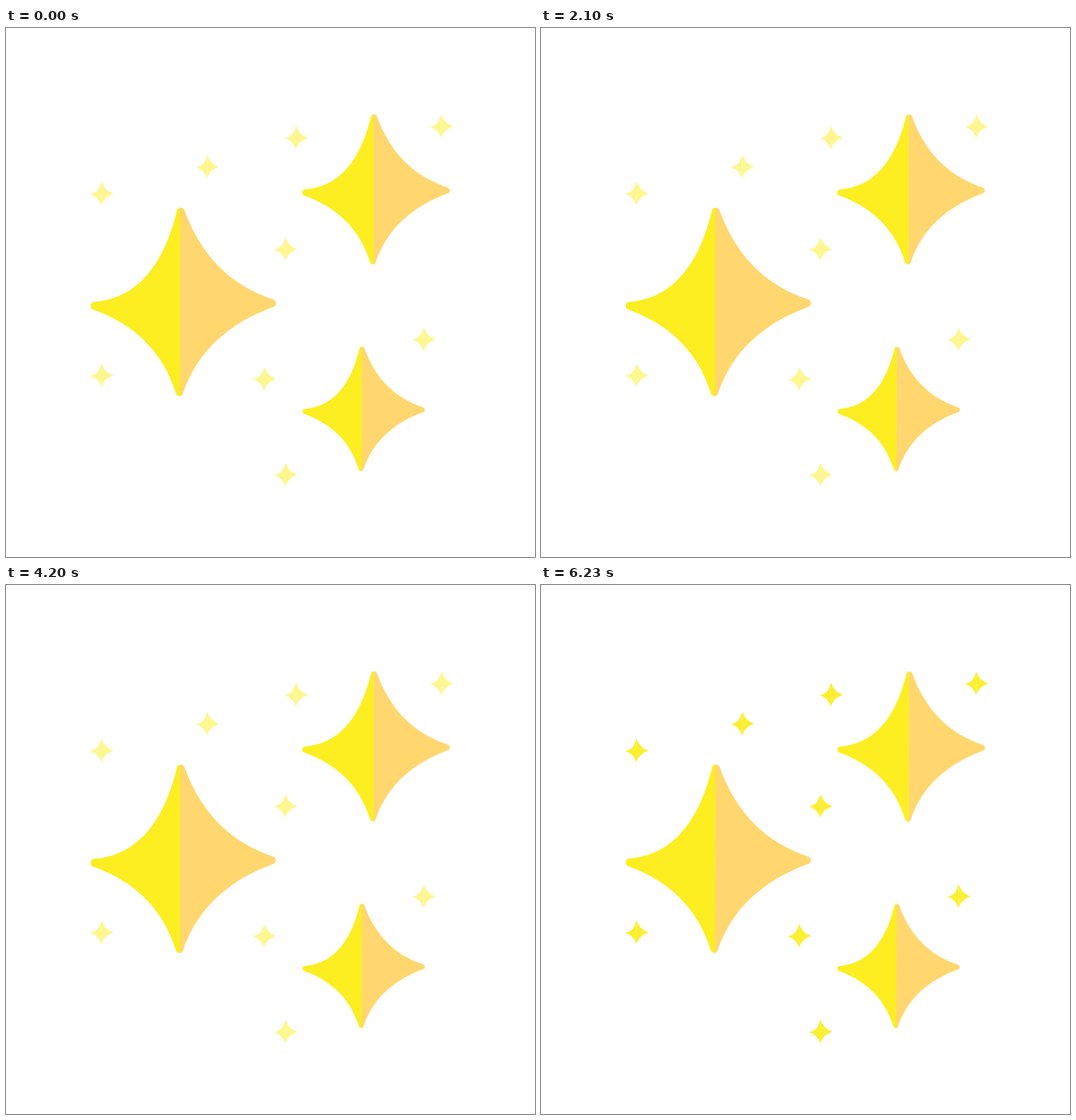
Animation, 748 px wide and 748 px high, one loop 6310 ms. Source, as an HTML page:

```html
<!DOCTYPE html>
<html lang="en">
<head>
<meta charset="utf-8">
<title>Sparkles</title>
<style>
  html, body { margin: 0; width: 100%; height: 100%; overflow: hidden; background: #fff; }
  svg { display: block; width: 100vw; height: 100vh; }
</style>
</head>
<body>
<svg viewBox="0 0 748 748">
  <defs>
    <path id="left" d="M246.2 254.1C243.8 254.5 242.2 255.6 241.8 258C222 340 182 383 124.5 387.3C118.5 388 118.5 397 123 398C182 419 222 458 240 516C240.8 519 243 520.6 246.2 520.5Z"/>
    <path id="right" d="M246 254C249 253.8 251.3 255 252.3 257.5C276 323 318 364 378 384C383 386 383 392.6 378 394.3C314 418 270 458 250.3 516.5C249.5 519 248 520.3 246 520.5Z"/>
    <g id="star">
      <use href="#right" fill="#ffd76e"/>
      <use href="#left" fill="#fcee21"/>
    </g>
    <g id="spark" fill="#fcee21" transform="scale(.1205) translate(-251 -387.5)">
      <use href="#right"/>
      <use href="#left"/>
    </g>
  </defs>
  <g id="sparks">
    <use href="#spark" x="135.5" y="234"/>
    <use href="#spark" x="285" y="196"/>
    <use href="#spark" x="410.5" y="155"/>
    <use href="#spark" x="616" y="139"/>
    <use href="#spark" x="395.5" y="312.5"/>
    <use href="#spark" x="135.5" y="491"/>
    <use href="#spark" x="365.5" y="496"/>
    <use href="#spark" x="591" y="440"/>
    <use href="#spark" x="395.5" y="631.5"/>
  </g>
  <g id="stars">
    <use href="#star"/>
    <use href="#star" transform="translate(323.4 -80.4) scale(.797)"/>
    <use href="#star" transform="translate(340.3 282.9) scale(.66)"/>
  </g>
</svg>
<script>
  const LOOP = 6310, STEP = 70, SWING = 1050, FADE = 210;
  const stars = document.getElementById('stars');
  const sparks = document.getElementById('sparks');
  const start = performance.now();

  const ease = s => {
    s = Math.min(1, Math.max(0, s));
    return s * s * (3 - 2 * s);
  };

  // Ten poses per 700 ms; the first of each ten is held longer.
  function poseAt(t) {
    const block = Math.floor(t / 700), rest = t % 700;
    const k = rest < 97 ? 0 : 1 + Math.floor((rest - 97) / 66.6);
    return Math.min(89, block * 10 + Math.min(9, k));
  }

  function draw(now) {
    const time = poseAt(Math.max(0, now - start) % LOOP) * STEP;

    const swing = 1 - Math.abs(time % (2 * SWING) / SWING - 1);
    stars.setAttribute('transform', `rotate(${10 * ease(swing)} 374 374)`);

    // Fade out and back in once per half swing.
    const blink = (time + FADE / 2) % SWING / FADE;
    sparks.setAttribute('opacity', blink < 1 ? 1 - ease(blink) : ease(blink - 1));

    requestAnimationFrame(draw);
  }
  draw(start);
</script>
</body>
</html>
```
